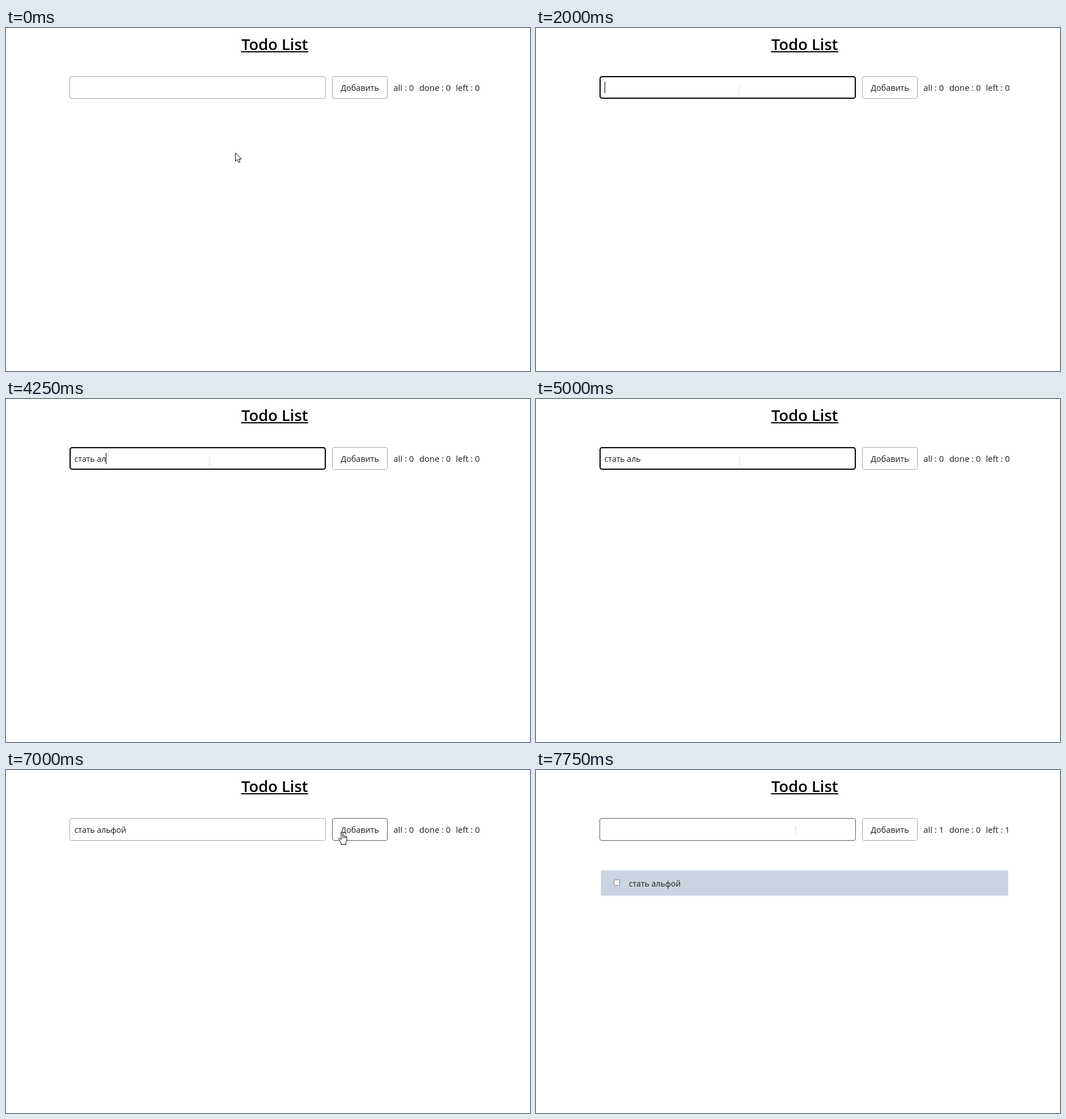
Animation, 924 px wide and 606 px high, one loop 8000 ms. Source, as an HTML page:

```html
<!DOCTYPE html>
<html lang="ru">
<head>
<meta charset="utf-8">
<title>Todo List</title>
<style>
  html, body { margin: 0; width: 100%; height: 100%; overflow: hidden; background: #fff; }
  svg { display: block; width: 924px; height: 606px; }
  text { font: 14.8px "Open Sans", "Noto Sans", sans-serif; fill: #1c1c1f; white-space: pre; }
  .title { font-size: 27.3px; font-weight: 600; fill: #000; text-anchor: middle; }
  .label { font-size: 14.4px; text-anchor: middle; }
  .todo { font-size: 14.1px; }
  .field { fill: #fff; }
  .cursor { fill: #fff; stroke: #000; stroke-linejoin: round; }
  .beam { fill: none; stroke: #dcdcdc; }
</style>
</head>
<body>
<svg viewBox="0 0 924 606">
  <text class="title" x="473.7" y="39">Todo List</text>
  <rect x="414.5" y="41" width="118.5" height="2"/>

  <rect id="input" class="field" rx="3.5"/>
  <text id="typed" class="todo" x="120.6" y="111"></text>
  <rect id="caret" y="95" width="1" height="20"/>

  <rect id="button" class="field" x="575.5" y="85.5" width="97" height="39" rx="3.5"/>
  <text class="label" x="624" y="111">Добавить</text>

  <text id="all" x="683.3" y="111"></text>
  <text x="728.8" y="111">done : 0</text>
  <text id="left" x="793.2" y="111"></text>

  <g id="item">
    <rect x="114.5" y="177.5" width="718" height="44.5" fill="#cad4e0"/>
    <rect x="137.5" y="194" width="10" height="10" rx="2" fill="#fff" stroke="#767676"/>
    <text class="todo" x="163.8" y="206">стать альфой</text>
  </g>

  <path id="arrow" class="cursor" d="M.5 .7V15.5L4 12.3L6.3 17.5L8.7 16.5L6.5 11.4H11Z"/>
  <g id="hand" class="cursor">
    <path d="M5 13V2Q5 .5 6.5 .5T8 2V7Q10 5.8 10.8 7.6Q12.6 6.6 13.2 8.4Q15 8 15 10V15Q15 17 13.5 18.5V22.5H5V20Q3.5 17 1 14Q0 12 1.5 11.5Q3 11.3 5 14Z"/>
    <path d="M8 7V11.5M10.8 8V11.5M13.2 9V11.5" fill="none"/>
  </g>
  <path id="beam" class="beam" d="M-2 -6.5H0M1 -6.5H3M.5 -6V6M-2 6.5H0M1 6.5H3"/>
</svg>
<script>
const LOOP = 8000;
const PHRASE = 'стать альфой';
const $ = id => document.getElementById(id);

// Each track holds [start time, value...]; a value stays until the next entry.
const cursorTrack = [
  [0, 'arrow', 404, 220], [500, 'arrow', 369, 129], [750, 'beam', 358, 109],
  [6500, ''], [6750, 'hand', 583, 109], [7000, 'hand', 586, 109],
  [7500, 'beam', 493, 119], [7750, 'beam', 457, 107]
];
const inputTrack = [[0, 'idle'], [750, 'hover'], [1000, 'focus'], [6750, 'idle'], [7500, 'hover']];
const buttonTrack = [[0, 'idle'], [7000, 'hover'], [7500, 'idle']];
const typedTrack = [
  [0, 0], [3000, 1], [3250, 4], [3500, 5], [3750, 6], [4250, 8],
  [4500, 9], [5250, 10], [5500, 11], [6000, 12], [7250, 0]
];
const caretTrack = [
  [0, false], [1000, true], [1500, false], [2000, true], [2750, false],
  [3000, true], [5000, false], [5250, true], [6500, false]
];
const borders = { idle: '#a3a3b5', hover: '#55555f', focus: '#000' };

const at = (track, t) => track.findLast(entry => entry[0] <= t).slice(1);

function set(node, attributes) {
  for (const name in attributes) node.setAttribute(name, attributes[name]);
}

function show(id, visible) {
  $(id).style.display = visible ? '' : 'none';
}

function drawInput(state) {
  const focused = state === 'focus';
  const inset = focused ? 1 : 0.5;
  set($('input'), {
    x: 112 + inset, y: 85 + inset,
    width: 452 - 2 * inset, height: 40 - 2 * inset,
    stroke: borders[state], 'stroke-width': focused ? 2 : 1
  });
}

function drawCursor(kind, x, y) {
  for (const id of ['arrow', 'hand', 'beam']) show(id, id === kind);
  if (kind) set($(kind), { transform: `translate(${x} ${y})` });
}

function render(t) {
  const added = t >= 7250;
  const count = added ? 1 : 0;

  drawInput(at(inputTrack, t)[0]);
  set($('button'), { stroke: borders[at(buttonTrack, t)[0]] });

  $('typed').textContent = PHRASE.slice(0, at(typedTrack, t)[0]);
  show('caret', at(caretTrack, t)[0]);
  set($('caret'), { x: Math.round(120.6 + $('typed').getComputedTextLength()) });

  $('all').textContent = `all : ${count}`;
  $('left').textContent = `left : ${count}`;
  show('item', added);
  drawCursor(...at(cursorTrack, t));
}

const start = performance.now();
function tick() {
  render((performance.now() - start) % LOOP);
  requestAnimationFrame(tick);
}
tick();
</script>
</body>
</html>
```
